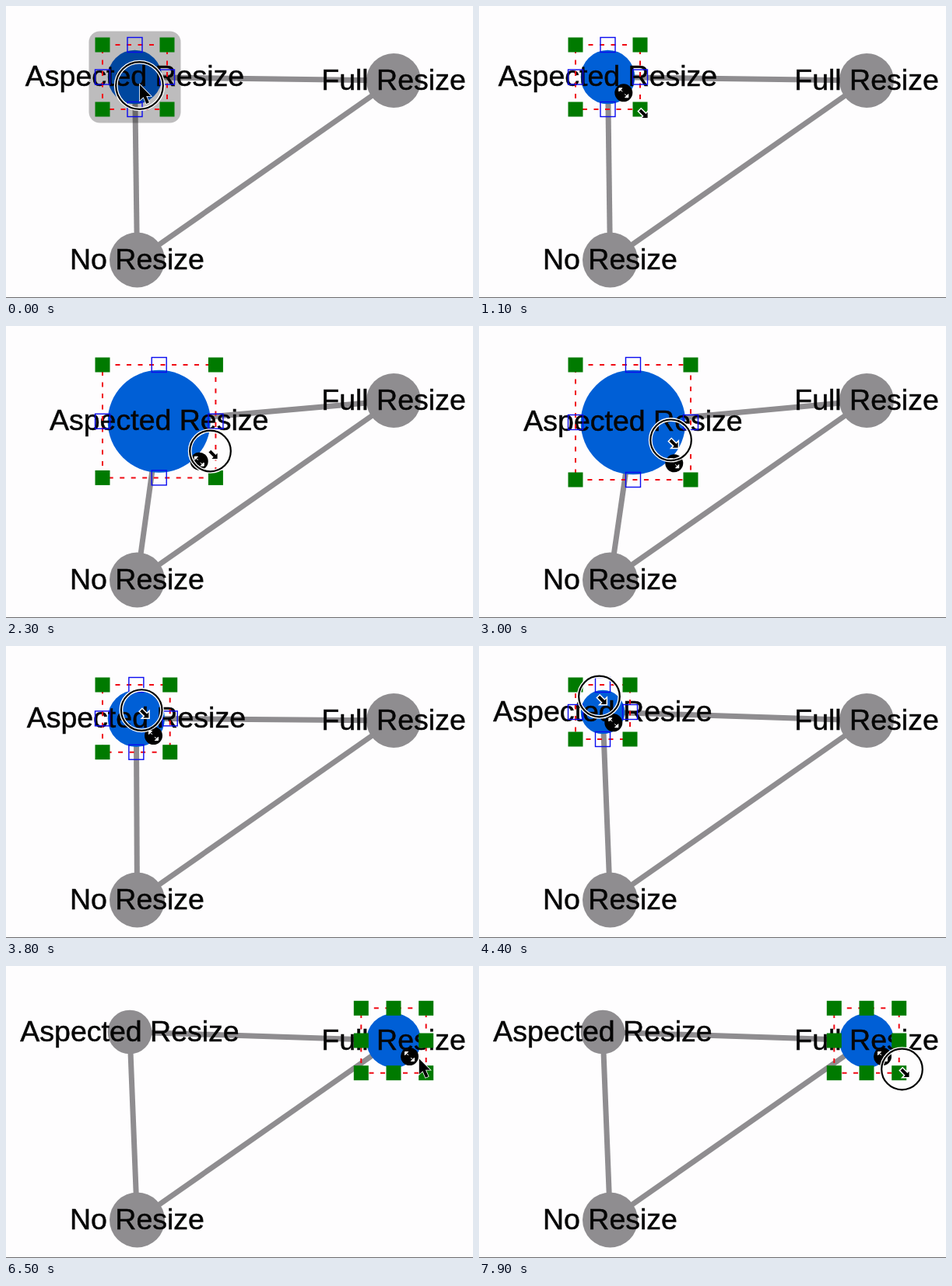
Animation of 600x376 px, one loop 8000 ms. Source, as an HTML page:

```html
<!DOCTYPE html>
<html lang="en">
<head>
<meta charset="utf-8">
<title>Node resize</title>
<style>
html, body { margin: 0; width: 100%; height: 100%; overflow: hidden; background: #fefdfe; }
svg { display: block; width: 100vw; height: 100vh; }
text {
  font: 37.5px "Liberation Sans", Arial, sans-serif; text-anchor: middle;
  fill: #060606; stroke: #060606; stroke-width: 0.5;
}
</style>
</head>
<body>
<svg id="stage" viewBox="0 0 600 376"></svg>
<script>
const LOOP = 8000, STEP = 100;
const GREY = '#8f8d90', BLUE = '#005fd6', GREEN = '#007a00';
const PAD = 6.7, CORNER = { x: 124, y: 50 };
const stage = document.getElementById('stage');

function set(el, attrs) {
  for (const k in attrs) el.setAttribute(k, attrs[k]);
}
function add(tag, attrs, parent = stage) {
  const el = document.createElementNS('http://www.w3.org/2000/svg', tag);
  set(el, attrs);
  parent.appendChild(el);
  return el;
}
function show(el, on) {
  el.style.display = on ? '' : 'none';
}
function place(el, x, y) {
  set(el, { transform: `translate(${x} ${y})` });
}

// Eased value that goes from 0 at time a to 1 at time b
function ease(t, a, b) {
  const u = Math.min(1, Math.max(0, (t - a) / (b - a)));
  return u * u * (3 - 2 * u);
}
// Runs a value through a chain of eased moves
function glide(t, from, ...moves) {
  return moves.reduce((v, { a, b, to }) => v + (to - v) * ease(t, a, b), from);
}

const reach = { a: 600, b: 1100, x: 208, y: 134 };
const pull = { a: 1500, b: 2300, x: 263, y: 161 };
const push = { a: 2600, b: 4250, x: 155, y: 65 };
const cross = { a: 4800, b: 5560, x: 500, y: 91 };
const settle = { a: 6150, b: 6700, x: 544, y: 133 };
const moves = [reach, pull, push, cross, settle];

const along = axis => t =>
  glide(t, { x: 172, y: 102.5 }[axis], ...moves.map(m => ({ ...m, to: m[axis] })));
const pointerX = along('x'), pointerY = along('y');
const boxSide = t => glide(t, 83, { a: 1570, b: push.a, to: 161.5 }, { ...push, to: 70 });

const presses = [
  { down: -200, up: -100 },
  { down: pull.a, up: 4500 },
  { down: 5700, up: 5800 },
  { down: 7800, up: LOOP }
];

const nodes = [
  { name: 'Aspected Resize' },
  { name: 'Full Resize', x: 498, y: 96, r: 35 },
  { name: 'No Resize', x: 168.5, y: 327, r: 35.5 }
];
const [first, full, last] = nodes;

const lines = [[first, full], [first, last], [full, last]].map(([p, q]) =>
  ({ p, q, el: add('line', { stroke: GREY, 'stroke-width': 7 }) }));
for (const n of nodes) {
  n.disc = add('circle', {});
  n.label = add('text', {});
  n.label.textContent = n.name;
}
add('rect', { y: 375, width: 600, height: 1, fill: '#6c6b6d' });
const overlay = add('rect', { x: -59, y: -59, width: 118, height: 118, rx: 14, opacity: 0.26 });

// Selection frame with eight handles
const frame = add('path', {
  fill: 'none', stroke: '#f00a14', 'stroke-width': 2,
  'stroke-dasharray': '6 8.5', 'stroke-dashoffset': -2
});
const handles = [];
for (let j = -1; j <= 1; j++)
  for (let i = -1; i <= 1; i++)
    if (i || j) handles.push({ i, j, el: add('rect', { width: 19, height: 19, 'stroke-width': 1.4 }) });

const badge = add('g', {});
add('circle', { r: 11.5 }, badge);
for (const angle of [0, 180])
  add('path', {
    d: 'M1.5 1.5L5 5M6 1.8V6H1.8Z', fill: '#fff', stroke: '#fff',
    transform: `rotate(${angle})`
  }, badge);

const ring = add('g', { fill: 'none' });
const halo = add('circle', { stroke: '#fff', 'stroke-width': 4.8 }, ring);
const rim = add('circle', { stroke: '#000', 'stroke-width': 2.2 }, ring);

const arrow = add('path', {
  d: 'M0 -1V19L4.6 14.8L8.3 23.4L11.9 21.8L8.2 13.4H14.2Z',
  stroke: '#fff', 'stroke-width': 1.6, 'paint-order': 'stroke'
});
const grip = add('path', {
  d: 'M-1.2 0.2L0.2 -1.2L6.4 5L8.6 2.8V10H1.4L3.6 7.8L-2.6 1.6Z',
  stroke: '#fff', 'stroke-width': 3, 'paint-order': 'stroke'
});

function drawSelection(n, free) {
  const h = n.r + PAD;
  set(frame, { d: `M${n.x - h} ${n.y - h}h${2 * h}v${2 * h}h${-2 * h}Z` });
  for (const { i, j, el } of handles) {
    const solid = free || (i && j);
    set(el, {
      x: n.x + i * h - 9.5, y: n.y + j * h - 9.5,
      fill: solid ? GREEN : 'none', stroke: solid ? 'none' : '#0a0af0'
    });
  }
  const d = n.r - 14.5;
  place(badge, n.x + d, n.y + d);
}

function drawPointer(t) {
  const x = pointerX(t), y = pointerY(t);
  const resizing = (t >= reach.b && t < 4500) || t >= settle.b;
  show(arrow, !resizing);
  show(grip, resizing);
  place(arrow, x, y);
  place(grip, x, y);

  // The ring grows and fades after release
  const press = presses.filter(p => p.down <= t).pop();
  const age = Math.max(0, t - press.up);
  const r = 26.3 + age * 0.04;
  place(ring, x - 0.5, y);
  set(ring, { opacity: 1 - Math.max(0, Math.min(1, (age - 100) / 300)) });
  set(halo, { r });
  set(rim, { r });
}

function render(t) {
  const half = boxSide(t) / 2;
  first.x = CORNER.x + half;
  first.y = CORNER.y + half;
  first.r = half - PAD;

  const picked = t < 5800 ? first : full;
  for (const n of nodes) {
    set(n.disc, { cx: n.x, cy: n.y, r: n.r, fill: n === picked ? BLUE : GREY });
    set(n.label, { x: n.x, y: n.y + 11.5 });
  }
  for (const { p, q, el } of lines) set(el, { x1: p.x, y1: p.y, x2: q.x, y2: q.y });

  const held = t < 100 ? first : t >= 5700 && t < 5900 ? full : null;
  show(overlay, held);
  if (held) place(overlay, held.x, held.y);

  show(badge, !held);
  drawSelection(picked, picked === full);
  drawPointer(t);
}

const start = performance.now();
function tick() {
  const t = (performance.now() - start) % LOOP;
  render(Math.floor(t / STEP) * STEP);
  requestAnimationFrame(tick);
}
tick();
</script>
</body>
</html>
```
